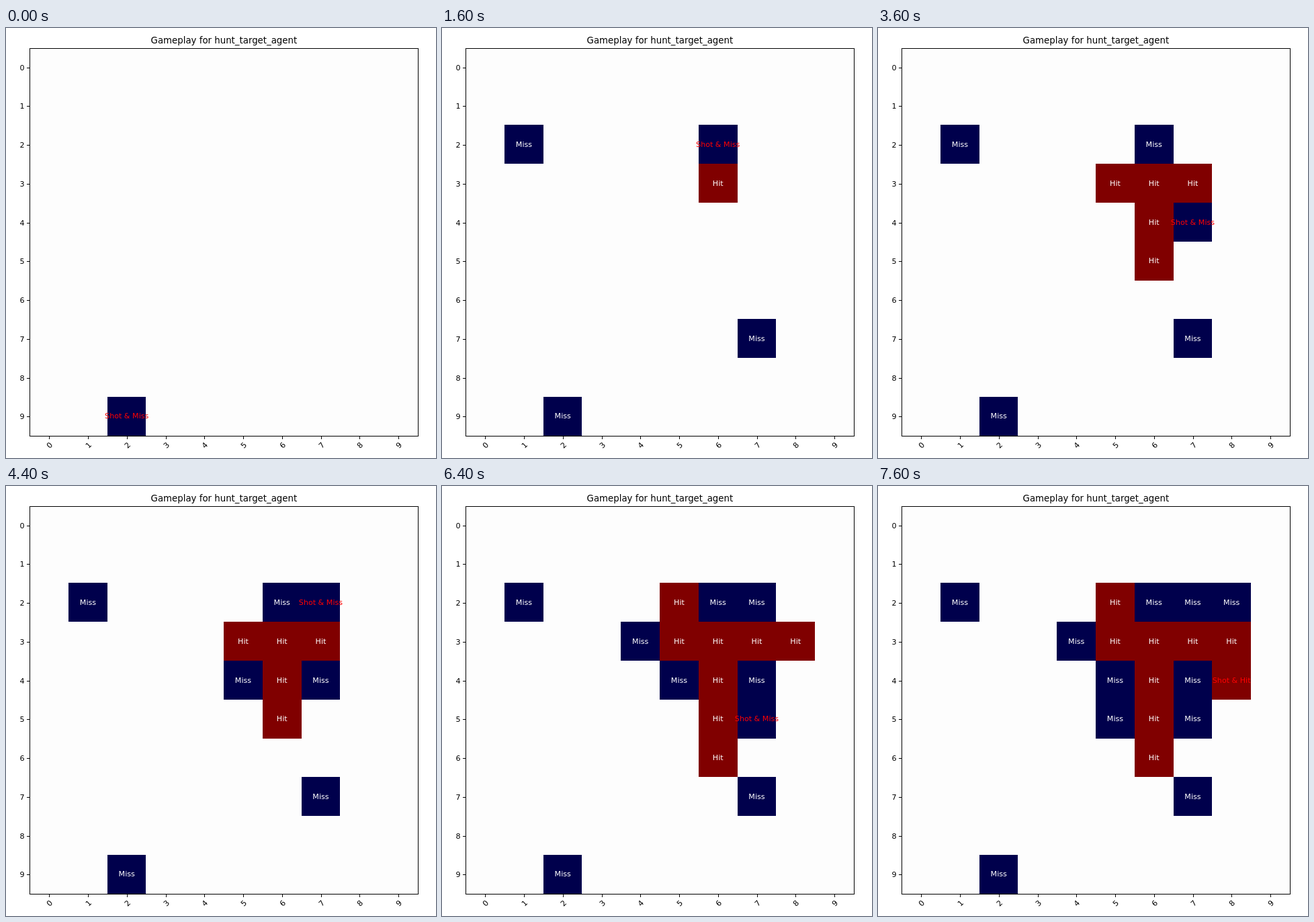
These frames come from a looping animation (640x640 px, 8 s). An HTML page:

```html
<!DOCTYPE html>
<html lang="en">
<head>
<meta charset="utf-8">
<title>Gameplay</title>
<style>
  html, body { margin: 0; height: 100%; overflow: hidden; background: #fff; }
  svg { display: block; width: 100%; height: 100%; }
  text { font: 11.11px "DejaVu Sans", sans-serif; text-anchor: middle; }
  rect { shape-rendering: crispEdges; }
  .title { font-size: 13.33px; }
  .yLabel { text-anchor: end; }
  .Miss, .Hit { fill: #fff; }
  .shot { fill: #f00; }
</style>
</head>
<body>
<svg viewBox="0 0 640 640">
  <rect x="35" y="30" width="578" height="577" fill="#fdfdfd"/>
  <g id="cells"></g>
  <g id="axes"></g>
  <g id="labels"></g>
</svg>
<script>
const STEP = 400;
// Each shot: row, column, outcome (m = miss, h = hit).
const shots = ("92m 77m 21m 36h 26m 46h 37h 35h 56h 47m " +
  "45m 27m 38h 25h 34m 66h 57m 55m 28m 48h").split(" ")
  .map(([row, col, kind]) => ({ row: +row, col: +col, word: kind === "h" ? "Hit" : "Miss" }));
const fills = { Hit: "#800000", Miss: "#00004c" };

const tickX = i => Math.round(64.3 + 57.75 * i);
const tickY = i => Math.round(58.7 + 57.75 * i);
const edgeX = i => Math.round(35.2 + 57.76 * i);
const edgeY = i => Math.round(28.8 + 57.8 * i);

const rect = (x, y, w, h, fill = "#000") =>
  `<rect x="${x}" y="${y}" width="${w}" height="${h}" fill="${fill}"/>`;
const text = (x, y, str, cls = "", extra = "") =>
  `<text x="${x}" y="${y}" class="${cls}" ${extra}>${str}</text>`;
const put = (id, html) => { document.getElementById(id).innerHTML = html; };

function drawAxes() {
  let out = rect(35, 30, 1, 578) + rect(613, 30, 1, 578) +
    rect(35, 30, 579, 1) + rect(35, 607, 579, 1) +
    text(324.4, 23, "Gameplay for hunt_target_agent", "title");
  for (let i = 0; i < 10; i++) {
    const x = tickX(i), y = tickY(i);
    out += rect(31, y, 4, 1) + text(27.7, y + 4, i, "yLabel") + rect(x, 608, 1, 4) +
      text(0, 4, i, "", `transform="translate(${x + 0.6} 621) rotate(-45)"`);
  }
  put("axes", out);
}

function drawShots(last) {
  let cells = "", labels = "";
  shots.slice(0, last + 1).forEach(({ row, col, word }, i) => {
    const x = edgeX(col), y = edgeY(row), isLast = i === last;
    cells += rect(x, y, edgeX(col + 1) - x, edgeY(row + 1) - y, fills[word]);
    labels += text(64.2 + 57.75 * col, tickY(row) + 3,
      isLast ? "Shot &amp; " + word : word, isLast ? "shot" : word);
  });
  put("cells", cells);
  put("labels", labels);
}

const start = performance.now();
let shown = -1;
function tick() {
  const step = Math.floor((performance.now() - start) / STEP) % shots.length;
  if (step !== shown) drawShots(shown = step);
  requestAnimationFrame(tick);
}
drawAxes();
tick();
</script>
</body>
</html>
```
